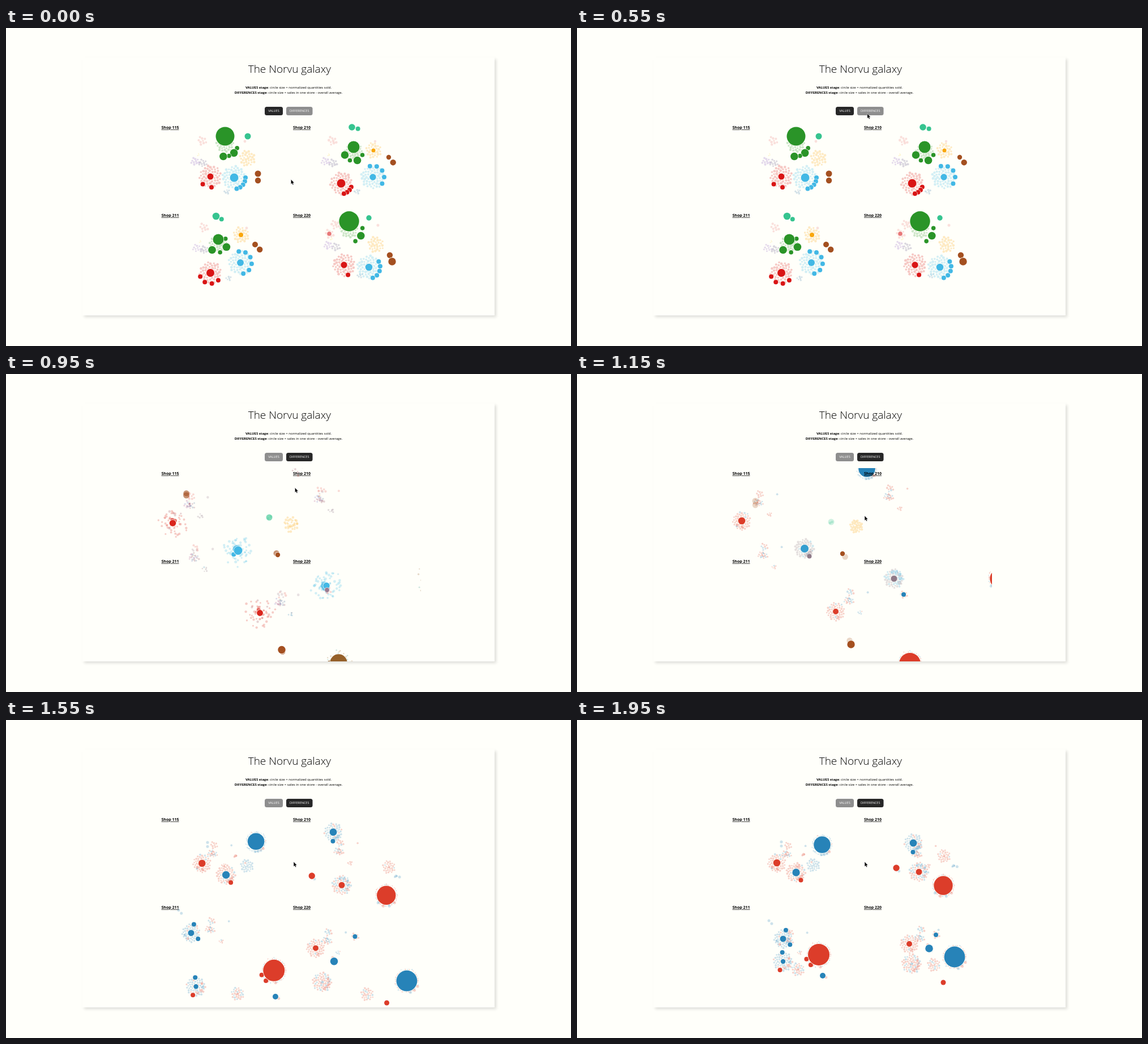
An HTML page with a canvas that plays this animation: 998 px wide and 561 px high, repeating every 2.95 s.

```html
<!DOCTYPE html>
<html lang="en">
<head>
<meta charset="utf-8">
<title>Shop galaxy</title>
<style>
html, body { margin: 0; width: 100%; height: 100%; overflow: hidden; background: #fffffa; }
.card { position: absolute; left: 135px; top: 52px; width: 728px; height: 455px; background: #fffffa; box-shadow: 3px 3px 5px rgba(0, 0, 0, .13); }
canvas, svg { position: absolute; left: 0; top: 0; width: 998px; height: 561px; }
text { font-family: "Open Sans", sans-serif; fill: #000; }
.title { font-size: 19px; font-weight: 300; }
.note { font-size: 6px; text-anchor: middle; }
.note tspan, .shop { font-weight: 700; }
.shop { font-size: 7px; text-decoration: underline; }
.button { font-size: 5.5px; fill: #fff; text-anchor: middle; }
</style>
</head>
<body>
<div class="card"></div>
<canvas></canvas>
<svg viewBox="0 0 998 561">
  <text class="title" x="427.7" y="79">The Norvu galaxy</text>
  <text class="note" x="499" y="107"><tspan>VALUES stage</tspan>: circle size = normalized quantities sold.</text>
  <text class="note" x="499" y="116.3"><tspan>DIFFERENCES stage</tspan>: circle size = sales in one store - overall average.</text>
  <rect id="values" x="457" y="139" width="32" height="15" rx="3.5"/>
  <rect id="differences" x="495" y="139" width="46.5" height="15" rx="3.5"/>
  <text class="button" x="473" y="148.3">VALUES</text>
  <text class="button" x="518.2" y="148.3">DIFFERENCES</text>
  <text class="shop" x="274.5" y="178">Shop 115</text>
  <text class="shop" x="507" y="178">Shop 210</text>
  <text class="shop" x="274.5" y="333">Shop 211</text>
  <text class="shop" x="507" y="333">Shop 220</text>
  <path id="cursor" d="M0 0V8.6L1.9 6.9L3.2 9.8L4.7 9.1L3.5 6.3H6Z" stroke="#fff" stroke-width=".5"/>
</svg>
<script>
const LOOP = 2950, STEP = 50;
const CLICK = 600, LAUNCH = 550, BURST = 750, TURN = 1150, REST = 1950;
const PAPER = '#fffffa', PALE = .23;

const clamp = v => Math.min(1, Math.max(0, v));
const progress = (t, from, to) => clamp((t - from) / (to - from));
const ease = v => v * v * (3 - 2 * v);
const mix = (a, b, u) => a + (b - a) * u;
const mixAll = (a, b, u) => a.map((v, i) => mix(v, b[i], u));
const add = (a, b) => a.map((v, i) => v + b[i]);
const times = (a, s) => a.map(v => v * s);
const polar = (deg, d) => [d * Math.cos(deg * Math.PI / 180), d * Math.sin(deg * Math.PI / 180)];
const rgb = hex => [1, 3, 5].map(i => parseInt(hex.slice(i, i + 2), 16));

let seed = 7;
const random = () => (seed = seed * 16807 % 2147483647) / 2147483647;

const UP = rgb('#2783b8'), DOWN = rgb('#dc3d2a');

// n, r: pale dots and their radius; rim: distance of satellites; turn: start of recolouring.
const kind = (color, n, r, rim = 0, turn = 850, satellite = 4) => ({ color: rgb(color), n, r, rim, turn, satellite });
const GREEN = kind('#2a9428', 40, 2.1, 0, 800);
const TEAL = kind('#36c48f', 2, 2.3, 11, TURN);
const RED = kind('#d91515', 54, 2.3, 19);
const SKY = kind('#42b8e5', 60, 2.3, 20, 1025);
const BROWN = kind('#a45020', 0, 2.3, 12, TURN, 5.2);
const GOLD = kind('#f9a60b', 30, 2.2, 0, TURN);
const PINK = kind('#e87878', 9, 2.3);

// Small groups sit in the same direction from the middle of every shop.
const SMALL = [
  [PINK, [-44, -38]],
  [kind('#8a5ac0', 10, 2), [-56, -2]],
  [kind('#5f5485', 10, 2), [-42, 1]],
  [kind('#f6d540', 3, 1.2), [-50, -13]],
  [kind('#3f7fae', 6, 1.7), [0, 52]],
  [kind('#e87878', 1, 2.4), [30, -37]]
];

const dots = [], discs = [];
let settle;

// Each cluster flies from start to kick, then falls back to home.
// core: [radius, end radius, up]; satellites: [count, from, to] in degrees;
// keep: [end angle, up] of the satellites that stay large.
function cluster(kind, upShare, start, kick, home, options = {}) {
  const { core, satellites: [count, from, to = from] = [0, 0], keep = [], burst = add(kick, [7, 8]) } = options;
  const path = { start, burst, kick, home, settle };
  const isGreen = kind === GREEN;
  const ring = isGreen ? core[1] : 0;
  const drop = isGreen ? [0, core[0] * .8] : [0, 0];
  const rim = isGreen ? core[0] + 6 : kind.rim;
  const toRing = (offset, gap) => times(offset, (ring + gap) / Math.hypot(...offset));
  const body = (list, offsets, r, alpha, up) => list.push({
    path, offsets, r, alpha, turn: kind.turn, colors: [kind.color, up ? UP : DOWN]
  });

  const loose = kind.n > 35;
  for (let i = 0; i < kind.n; i++) {
    const offset = polar(i * 137.508, 1.17 * kind.r * Math.sqrt(i + .5));
    const shake = polar(random() * 360, (loose ? 20 : 5) * random());
    const size = kind.r * (.7 + .4 * random());
    const last = ring ? toRing(offset, 1 + 3 * random() ** 2) : times(offset, .82);
    body(dots, [add(offset, drop), add(times(offset, loose ? 1.45 : 1), shake), last],
      [size, size * (ring ? .55 : .8)], [PALE, PALE], random() < upShare);
  }

  for (let i = 0; i < count; i++) {
    const offset = add(polar(mix(from, to, count > 1 ? i / (count - 1) : 0), rim), drop);
    const size = isGreen ? [3.8, 6.8][i % 2] : kind.satellite;
    const [angle, up] = keep[i] || [0, random() < upShare];
    const last = keep[i] ? polar(angle, ring ? ring + 4 : 16) : ring ? toRing(offset, 3) : times(offset, .6);
    body(discs, [offset, times(offset, -1.2), last], [size, keep[i] ? 4 : 2.5], [1, keep[i] ? 1 : PALE], up);
  }

  if (core) {
    const [r0, r1, up] = core;
    body(discs, [[0, 0], [0, 0], [0, 0]], [r0, r1], [1, r1 > 3 ? 1 : PALE], up);
  }
}

function shop(middle, drift, pace) {
  settle = pace;
  for (const [kind, offset] of SMALL) {
    const home = add(middle, times(offset, .4));
    cluster(kind, random(), add(middle, offset), add(home, drift), home);
  }
}

shop([390, 237], [-50, -10], 3.2);
cluster(GREEN, .9, [387, 191], [512, 167], [433, 220], { core: [16.5, 14.8, true], satellites: [4, 20, 98], burst: [500, 110] });
cluster(TEAL, 0, [427, 191], [449, 261], [400, 237], { core: [5.5, 2.5, false], burst: [481, 245] });
cluster(GOLD, .95, [426, 230], [493, 269], [417, 256], { burst: [514, 262] });
cluster(RED, .12, [361, 262], [291, 259], [353, 252], { core: [5.5, 6.3, false], satellites: [2, 84, 135] });
cluster(SKY, .15, [403, 264], [402, 308], [387, 269], { core: [7.5, 6.7, true], satellites: [5, 0, 77], keep: [[58, false]], burst: [418, 315] });
cluster(BROWN, .3, [445, 257], [315, 224], [361, 215], { core: [5.5, 2.6, true], satellites: [1, 90], burst: [322, 204] });

shop([620, 237], [-50, -20], 2);
cluster(GREEN, .4, [614, 210], [746, 361], [647, 292], { core: [10.5, 16.7, false], satellites: [4, 20, 160] });
cluster(TEAL, 1, [611, 175], [760, 330], [665, 257], { core: [5.8, 2.5, true], satellites: [1, 15] });
cluster(GOLD, .05, [649, 216], [760, 318], [648, 240], { core: [3.5, 2, false] });
cluster(RED, .85, [592, 274], [530, 140], [594, 217], { core: [7.5, 6.5, true], satellites: [4, 20, 75], keep: [[92, true]], burst: [497, 155] });
cluster(SKY, .55, [648, 263], [560, 361], [604, 268], { core: [5.7, 5.5, false], satellites: [5, -105, 35], burst: [572, 386] });
cluster(BROWN, .5, [676, 228], [469, 317], [564, 261], { core: [4.2, 5.7, false], satellites: [1, 50], burst: [491, 321] });

shop([393, 390], [-45, -70], 1.8);
cluster(GREEN, .4, [375, 373], [588, 511], [427, 414], { core: [9.5, 19, false], satellites: [4, -35, 135], keep: [[160, false], [128, false]], burst: [587, 508] });
cluster(TEAL, .2, [371, 332], [580, 580], [434, 451], { core: [6.3, 5, true], satellites: [1, 28] });
cluster(GOLD, .6, [415, 365], [455, 590], [390, 440], { core: [4, 2, false] });
cluster(SKY, .8, [414, 414], [265, 580], [364, 426], { core: [6, 4.2, true], satellites: [6, -98, 75], keep: [[-95, true], [110, false]] });
cluster(RED, .9, [361, 432], [235, 350], [364, 386], { core: [7, 5.5, true], satellites: [4, 43, 160], keep: [[-72, true], [40, true]], burst: [215, 385] });
cluster(BROWN, 1, [440, 382], [220, 290], [339, 354], { core: [5, 2.5, true], satellites: [1, 47] });

shop([625, 385], [-125, 15], 1.7);
cluster(GREEN, .2, [606, 341], [800, 555], [667, 418], { core: [17.7, 18.4, true], satellites: [3, -5, 62] });
cluster(TEAL, 0, [641, 335], [730, 580], [647, 463], { core: [4.7, 4.5, false] });
cluster(GOLD, .3, [653, 382], [655, 600], [630, 432]);
cluster(PINK, .1, [571, 363], [577, 389], [634, 379], { core: [3.8, 4, true], burst: [557, 373] });
cluster(SKY, .3, [641, 422], [485, 535], [591, 430], { core: [6.3, 2.6, true], satellites: [5, -30, 70], burst: [540, 580] });
cluster(RED, .1, [597, 418], [457, 419], [587, 395], { core: [5.7, 5, false], satellites: [1, 68], burst: [440, 424] });
cluster(BROWN, 0, [682, 412], [484, 477], [622, 403], { core: [6.7, 6.8, true], satellites: [1, 250], burst: [490, 496] });

const canvas = document.querySelector('canvas'), ctx = canvas.getContext('2d');
const scale = window.devicePixelRatio || 1;
canvas.width = 998 * scale;
canvas.height = 561 * scale;
ctx.scale(scale, scale);
ctx.beginPath();
ctx.rect(266, 166, 467, 341);
ctx.clip();

function phased(a, b, c, t) {
  return t < BURST
    ? mixAll(a, b, progress(t, LAUNCH, BURST))
    : mixAll(b, c, ease(progress(t, BURST, TURN)));
}

function centerAt({ start, burst, kick, home, settle }, t) {
  if (t < TURN) return phased(start, burst, kick, t);
  return mixAll(home, kick, (1 - progress(t, TURN, REST)) ** settle);
}

function drawBody({ path, offsets, r, alpha, turn, colors }, t, outlined) {
  const [x, y] = add(centerAt(path, t), phased(...offsets, t));
  const change = progress(t, turn, turn + 250);
  ctx.globalAlpha = mix(...alpha, progress(t, BURST, TURN));
  ctx.beginPath();
  ctx.arc(x, y, mix(...r, change), 0, 2 * Math.PI);
  if (outlined && ctx.globalAlpha === 1) {
    ctx.strokeStyle = PAPER;
    ctx.lineWidth = 1.4;
    ctx.stroke();
  }
  ctx.fillStyle = `rgb(${mixAll(...colors, change).map(Math.round)})`;
  ctx.fill();
}

const byId = id => document.getElementById(id);

function render(t) {
  ctx.clearRect(0, 0, 998, 561);
  dots.forEach(body => drawBody(body, t, false));
  discs.forEach(body => drawBody(body, t, true));

  const active = '#272727', idle = '#8e8e8e', clicked = t >= CLICK;
  byId('values').setAttribute('fill', clicked ? idle : active);
  byId('differences').setAttribute('fill', clicked ? active : idle);
  const go = ease(progress(t, 50, 500)), back = ease(progress(t, 800, 1100));
  byId('cursor').setAttribute('transform', `translate(${503.3 + 9.4 * go - 4.7 * back} ${267 - 116 * go + 99 * back})`);
}

function tick(now) {
  render(Math.floor(now % LOOP / STEP) * STEP);
  requestAnimationFrame(tick);
}
render(0);
requestAnimationFrame(tick);
</script>
</body>
</html>
```
